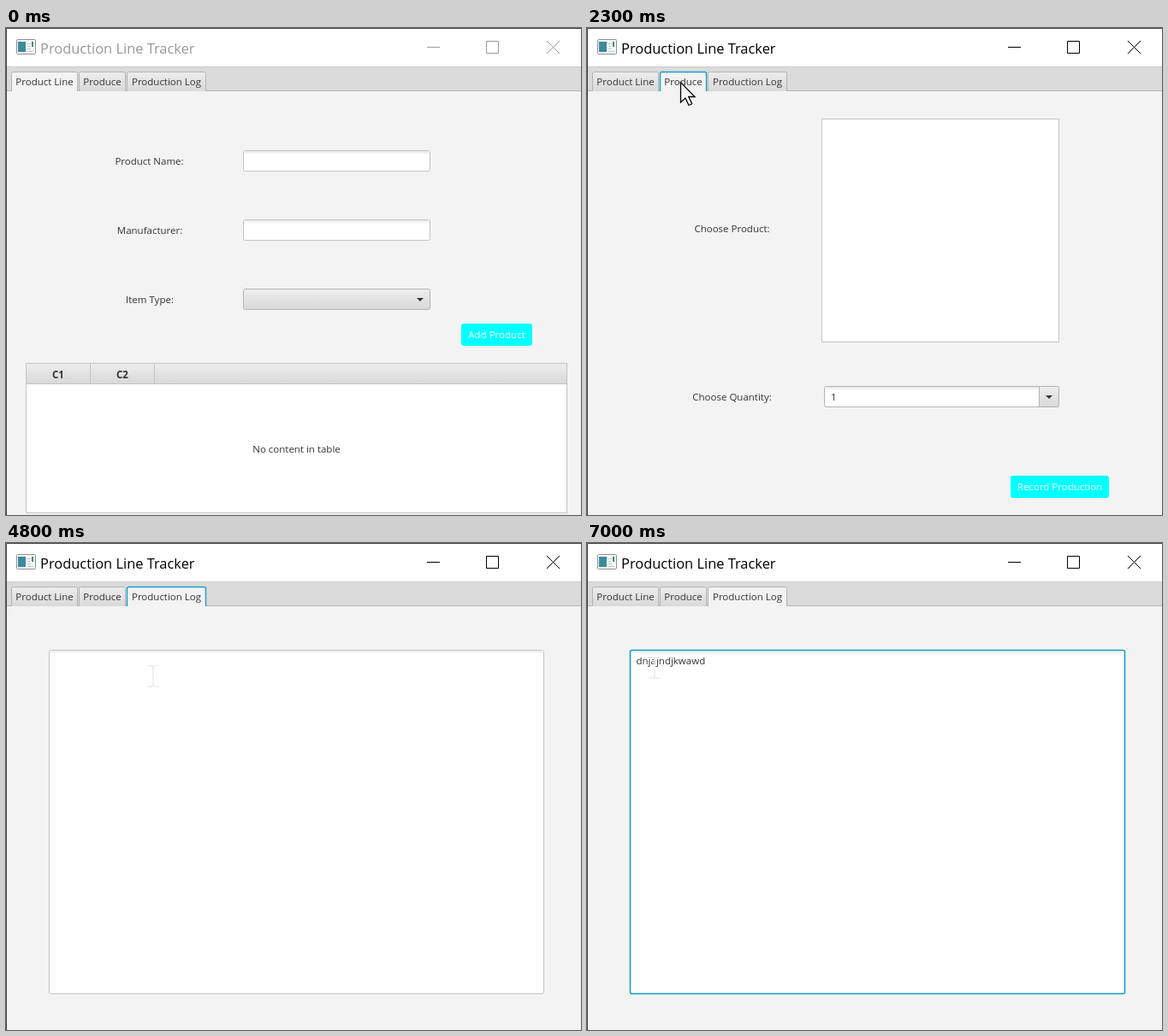
An HTML page that plays this animation: 672 px wide and 570 px high, repeating every 7200 ms.

```html
<!DOCTYPE html>
<html lang="en">
<head>
<meta charset="utf-8">
<title>Production Line Tracker</title>
<style>
  html, body { margin: 0; width: 100%; height: 100%; overflow: hidden; background: #f3f3f3; }
  svg { display: block; width: 672px; height: 570px; }
  text { font: 11.5px "Open Sans", "Noto Sans", sans-serif; fill: #333; }
  .mid { text-anchor: middle; }
  .bold { font-weight: 700; }
  .box { fill: #fff; stroke: #c4c4c4; }
  .grad { fill: url(#grey); stroke: #b4b4b4; }
  .cyan { fill: #0ff; }
  .cyan + text { fill: #fff; }
  #bar { --ink: #999; }
  #bar.active { --ink: #000; }
  #bar text { font-size: 16.45px; fill: var(--ink); }
  #bar .ctl { fill: none; stroke: var(--ink); }
  .tab path { fill: url(#grey); stroke: #b4b4b4; }
  .tab.hover path { fill: url(#light); }
  .tab.on path { fill: #f3f3f3; }
  .tab.focus path { stroke: #1a9fcb; stroke-width: 1.4; }
  #area.focus { stroke: #0b9bd0; stroke-width: 1.5; }
</style>
</head>
<body>
<svg viewBox="0 0 672 570">
  <defs>
    <linearGradient id="grey" x2="0" y2="1"><stop stop-color="#ededed"/><stop offset="1" stop-color="#d9d9d9"/></linearGradient>
    <linearGradient id="light" x2="0" y2="1"><stop stop-color="#f8f8f8"/><stop offset="1" stop-color="#e8e8e8"/></linearGradient>
    <linearGradient id="shade" x2="0" y2="1"><stop stop-color="#e6e6e6"/><stop offset="1" stop-color="#fff"/></linearGradient>
  </defs>
  <rect width="672" height="570" fill="#f3f3f3"/>

  <g id="bar">
    <rect width="672" height="45" fill="#fff"/>
    <rect x="12.5" y="13.5" width="22" height="17" rx="1" fill="#f7f7f7" stroke="#8b9298"/>
    <rect x="14" y="16" width="9" height="12" fill="#3d8a9c"/>
    <path d="M25 18.5h4M25 21.5h3M25 24.5h4M25 27.5h7" stroke="#bcc6cc"/>
    <path d="M31 16v6" stroke="#3f8f6a" stroke-width="2"/>
    <text x="40" y="30">Production Line Tracker</text>
    <path class="ctl" d="M492 22.5h15M561.5 15.5h14v14h-14zM632 15l15 15M647 15l-15 15"/>
  </g>

  <rect y="45" width="672" height="28" fill="#dbdbdb"/>
  <path d="M0 45.5h672" stroke="#cbcbcb"/>
  <path d="M0 73.5h672" stroke="#b4b4b4"/>
  <g id="tabs"></g>

  <g class="page">
    <text class="mid" x="167.5" y="160">Product Name:</text>
    <text class="mid" x="168" y="241">Manufacturer:</text>
    <text class="mid" x="168" y="322">Item Type:</text>
    <rect class="box" x="277.5" y="143.5" width="218" height="24" rx="2"/>
    <rect x="278" y="144" width="217" height="4" fill="url(#shade)"/>
    <rect class="box" x="277.5" y="224.5" width="218" height="24" rx="2"/>
    <rect x="278" y="225" width="217" height="4" fill="url(#shade)"/>
    <rect class="grad" x="277.5" y="305.5" width="218" height="24" rx="2"/>
    <path d="M480 316h8l-4 4z" fill="#333"/>
    <rect class="cyan" x="532" y="346" width="83" height="26" rx="3"/>
    <text class="mid" x="573.5" y="363">Add Product</text>
    <rect class="box" x="23.5" y="392.5" width="632" height="175"/>
    <rect x="24" y="393" width="631" height="23" fill="url(#grey)"/>
    <path d="M24 416.5h631M98.5 393v23M173.5 393v23" stroke="#c4c4c4"/>
    <text class="mid bold" x="61" y="410">C1</text>
    <text class="mid bold" x="136" y="410">C2</text>
    <text class="mid" x="339.5" y="497">No content in table</text>
  </g>

  <g class="page">
    <text class="mid" x="169.5" y="239">Choose Product:</text>
    <text class="mid" x="169.5" y="436">Choose Quantity:</text>
    <rect class="box" x="274.5" y="106.5" width="277" height="261"/>
    <rect class="box" x="277.5" y="419.5" width="274" height="24" rx="2" style="stroke:#b4b4b4"/>
    <rect x="278" y="420" width="250" height="4" fill="url(#shade)"/>
    <path class="grad" d="M528.5 419.5h21q2 0 2 2v20q0 2-2 2h-21z"/>
    <path d="M536 430h8l-4 4z" fill="#333"/>
    <text x="285" y="436">1</text>
    <rect class="cyan" x="495" y="524" width="115" height="26" rx="3"/>
    <text class="mid" x="552.5" y="541">Record Production</text>
  </g>

  <g class="page">
    <rect class="box" id="area" x="50.5" y="125.5" width="578" height="402" rx="2"/>
    <rect x="52" y="126.5" width="575" height="3" fill="url(#shade)"/>
    <text id="typed" x="57.5" y="142"></text>
  </g>

  <path d="M.5 570V.5H672" fill="none" stroke="#444"/>
  <path id="arrow" d="M.5 .5V24l5.5-5 4 8.5 3.7-1.7-4-8.3H17z" fill="#fff" stroke="#000" stroke-width="1.3"/>
  <path id="beam" d="M-6.5-12h4.500q2 0 2 2V10q0 2-2 2h-4.500M6.500-12H2q-2 0-2 2V10q0 2 2 2h4.500" fill="none" stroke="#ebebeb" stroke-width="1.6"/>
</svg>
<script>
const $ = id => document.getElementById(id);
const LOOP = 7200, STEP = 100;
const TO_PRODUCE = 2300, TO_LOG = 3800, AREA_CLICK = 5000;
const PHRASE = "dnjajndjkwawd";

// pointer path: time, x, y
const path = [
  [700, 606, 470], [1300, 131, 91], [1700, 104, 66], [2100, 109, 63], [2400, 109, 63],
  [3000, 186, 58], [3600, 185, 57], [3800, 185, 57], [4200, 255, 101], [4500, 230, 150],
  [5100, 113, 161], [5700, 113, 161], [6400, 79, 146], [LOOP, 79, 146]
];

const tabSpecs = [["Product Line", 6, 84], ["Produce", 85, 140], ["Production Log", 141, 234]];
$("tabs").innerHTML = tabSpecs.map(([name, l, r]) =>
  `<g class="tab"><path d="M${l + .5} 74V53.500q0-2 2-2H${r - 2.5}q2 0 2 2V74"/>
   <text class="mid" x="${(l + r) / 2}" y="67">${name}</text></g>`).join("");
const tabs = [...document.querySelectorAll(".tab")];
const pages = document.querySelectorAll(".page");

function pointer(t) {
  const i = path.findIndex(p => p[0] > t);
  if (i < 1) return null;
  const [t0, x0, y0] = path[i - 1], [t1, x1, y1] = path[i];
  const k = (t - t0) / (t1 - t0), e = k * k * (3 - 2 * k);
  return [x0 + (x1 - x0) * e, y0 + (y1 - y0) * e];
}

function place(el, pos, visible) {
  el.style.display = visible ? "" : "none";
  if (visible) el.setAttribute("transform", `translate(${pos.map(Math.round)})`);
}

function typedCount(t) {
  if (t < 6500) return 0;
  return t < 6800 ? 1 : Math.min(13, 5 + (t - 6800) / 25);
}

function draw(t) {
  const page = t < TO_PRODUCE ? 0 : t < TO_LOG ? 1 : 2;
  const areaFocus = t >= AREA_CLICK;
  const pos = pointer(t);
  $("bar").classList.toggle("active", page > 0);
  pages.forEach((p, i) => p.style.display = i === page ? "" : "none");
  tabs.forEach((tab, i) => {
    const [, l, r] = tabSpecs[i], on = i === page;
    tab.classList.toggle("on", on);
    tab.classList.toggle("focus", on && page > 0 && !areaFocus);
    tab.classList.toggle("hover", !!pos && pos[0] >= l && pos[0] < r && pos[1] > 50 && pos[1] < 74);
  });
  $("area").classList.toggle("focus", areaFocus);
  $("typed").textContent = PHRASE.slice(0, typedCount(t));
  const overText = !!pos && page === 2 && pos[1] > 125 && pos[0] > 50;
  place($("arrow"), pos, !!pos && !overText);
  place($("beam"), pos, overText);
}

const start = performance.now();
function tick() {
  const t = (performance.now() - start) % LOOP;
  draw(Math.floor(t / STEP) * STEP);
  requestAnimationFrame(tick);
}
tick();
</script>
</body>
</html>
```
